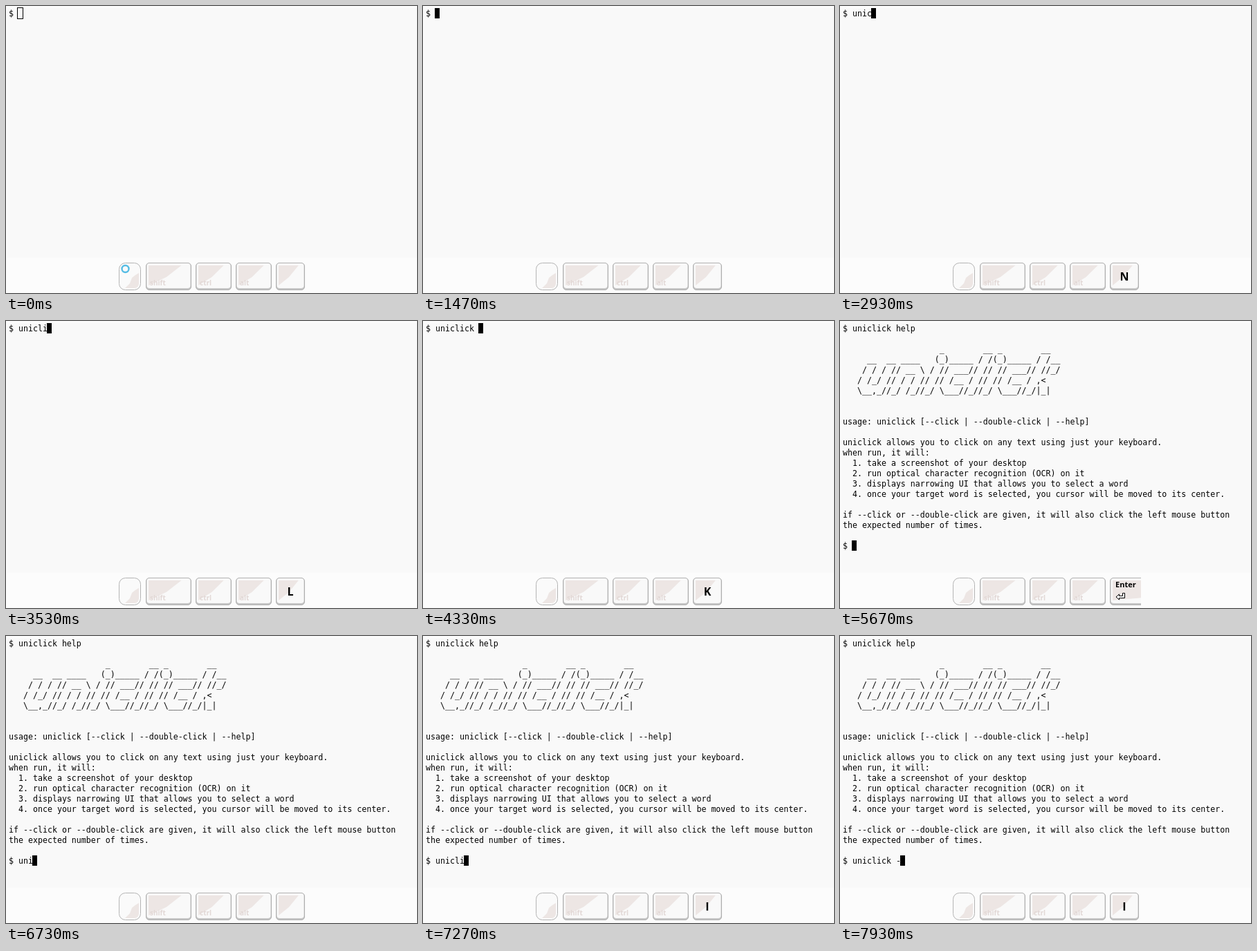
These frames come from a looping animation (594 px wide and 416 px high, 8000 ms). An HTML page:

```html
<!DOCTYPE html>
<html lang="en">
<head>
<meta charset="utf-8">
<title>Terminal typing</title>
<style>
  html, body { margin: 0; width: 100%; height: 100%; overflow: hidden; background: #fcfcfc; }
  #term { position: absolute; left: 2px; top: 3px; right: 0; height: 362px; background: #f9f9f9; }
  pre { position: absolute; left: 4px; top: 4px; margin: 0; color: #000;
        font: 11.627px/15px "DejaVu Sans Mono", monospace; }
  #cursor { position: absolute; box-sizing: border-box; background: #000; }
  #cursor.hollow { background: none; border: 1px solid #000; }
  svg { position: absolute; left: 0; top: 0; }
  text { font: bold 16px "Open Sans", sans-serif; }
  .mod { font-size: 10px; fill: #e2d8d6; }
  .name { font-size: 11px; }
</style>
</head>
<body>
<div id="term"></div>
<pre id="out"></pre>
<div id="cursor"></div>
<svg width="435" height="416">
  <g id="mods"></g>
  <rect x="163.5" y="372.5" width="31" height="39" rx="9" fill="#fafafa" stroke="#b4b4b4"/>
  <path d="M172 409 L179 402 L182 394 L187 390 L192 387 V403 Q191 409 185 409Z" fill="#ede6e4"/>
  <circle id="ring" cx="172.5" cy="381" r="5" fill="none" stroke="#55bce4" stroke-width="2.4"/>
  <g id="key"></g>
</svg>
<script>
const $ = id => document.getElementById(id);
const LOOP = 8000, CELL = 7, ROW = 15, ORIGIN = 3;

const help = String.raw`

                    _        __ _        __
     __  __ ____   (_)_____ / /(_)_____ / /__
    / / / // __ \ / // ___// // // ___// //_/
   / /_/ // / / // // /__ / // // /__ / ,<
   \__,_//_/ /_//_/ \___//_//_/ \___//_/|_|


usage: uniclick [--click | --double-click | --help]

uniclick allows you to click on any text using just your keyboard.
when run, it will:
  1. take a screenshot of your desktop
  2. run optical character recognition (OCR) on it
  3. displays narrowing UI that allows you to select a word
  4. once your target word is selected, you cursor will be moved to its center.

if --click or --double-click are given, it will also click the left mouse button
the expected number of times.

$ `;

// Each entry is [time, text added to the terminal].
const at = (chars, times) => times.map((t, i) => [t, chars[i]]);
const typing = [
  ...at("uniclick help\n", [2470, 2600, 2800, 2930, 3270, 3530, 3730, 3930, 4200,
                            4400, 4530, 4670, 4800, 4930]),
  [5130, help.slice(1)],
  ...at("uniclick -", [6270, 6400, 6530, 6870, 7070, 7270, 7400, 7530, 7670, 7930])
];

// Each entry is [time, label on the last key].
const presses = [
  [0, ""],
  ...at("UNICLICK", [2800, 2930, 3130, 3330, 3530, 3730, 3930, 4130]),
  [4400, "Space"], [4600, "H"], [4800, "E"], [5130, "L"], [5270, "P"],
  [5470, "Enter"], [6130, ""],
  ...at("UNICLI", [6800, 7000, 7200, 7400, 7600, 7800])
];

function cap(x, w) {
  return `<rect x="${x + .5}" y="372.5" width="${w - 1}" height="39" rx="4.5" fill="#c6c6c6" stroke="#b0b0b0"/>
    <rect x="${x + 1.5}" y="373" width="${w - 3}" height="36" rx="4" fill="#f9f9f9"/>
    <path d="M${x + 4} 376 H${x + w * .78} L${x + w * .45} 393 L${x + 4} 405Z" fill="#ede6e4"/>`;
}

// Named keys are wide and run past the right edge of the strip.
function keyArt(label) {
  if (label.length < 2)
    return cap(390, 42) + `<text x="411" y="398" text-anchor="middle">${label}</text>`;
  const arrow = label === "Enter"
    ? `<path d="M408.5 394.5 h3 v7 h-8 v2.5 l-4.5 -4 l4.5 -4 v2.5 h5z" fill="#fff" stroke="#000"/>` : "";
  return cap(390, 300) + `<text class="name" x="398" y="386">${label}</text>` + arrow;
}

$("mods").innerHTML = [[202, 66, "shift"], [274, 52, "ctrl"], [332, 52, "alt"]]
  .map(([x, w, name]) => cap(x, w) + `<text class="mod" x="${x + 6}" y="405">${name}</text>`).join("");

let shown;
function draw(t) {
  const text = "$ " + typing.filter(e => e[0] <= t).map(e => e[1]).join("");
  const lines = text.split("\n");
  const hollow = t < 1470, grow = hollow ? 1 : 0;
  $("out").textContent = text;
  $("cursor").className = hollow ? "hollow" : "";
  $("cursor").style.cssText =
    `left:${ORIGIN + lines.at(-1).length * CELL - grow}px;top:${ORIGIN + (lines.length - 1) * ROW - grow}px;` +
    `width:${CELL + 2 * grow}px;height:${ROW + 2 * grow}px`;
  $("ring").style.display = t < 200 ? "" : "none";

  const label = presses.filter(e => e[0] <= t).at(-1)[1];
  if (label !== shown) $("key").innerHTML = keyArt(shown = label);
}

const start = performance.now();
function frame() {
  draw((performance.now() - start) % LOOP);
  requestAnimationFrame(frame);
}
frame();
</script>
</body>
</html>
```
